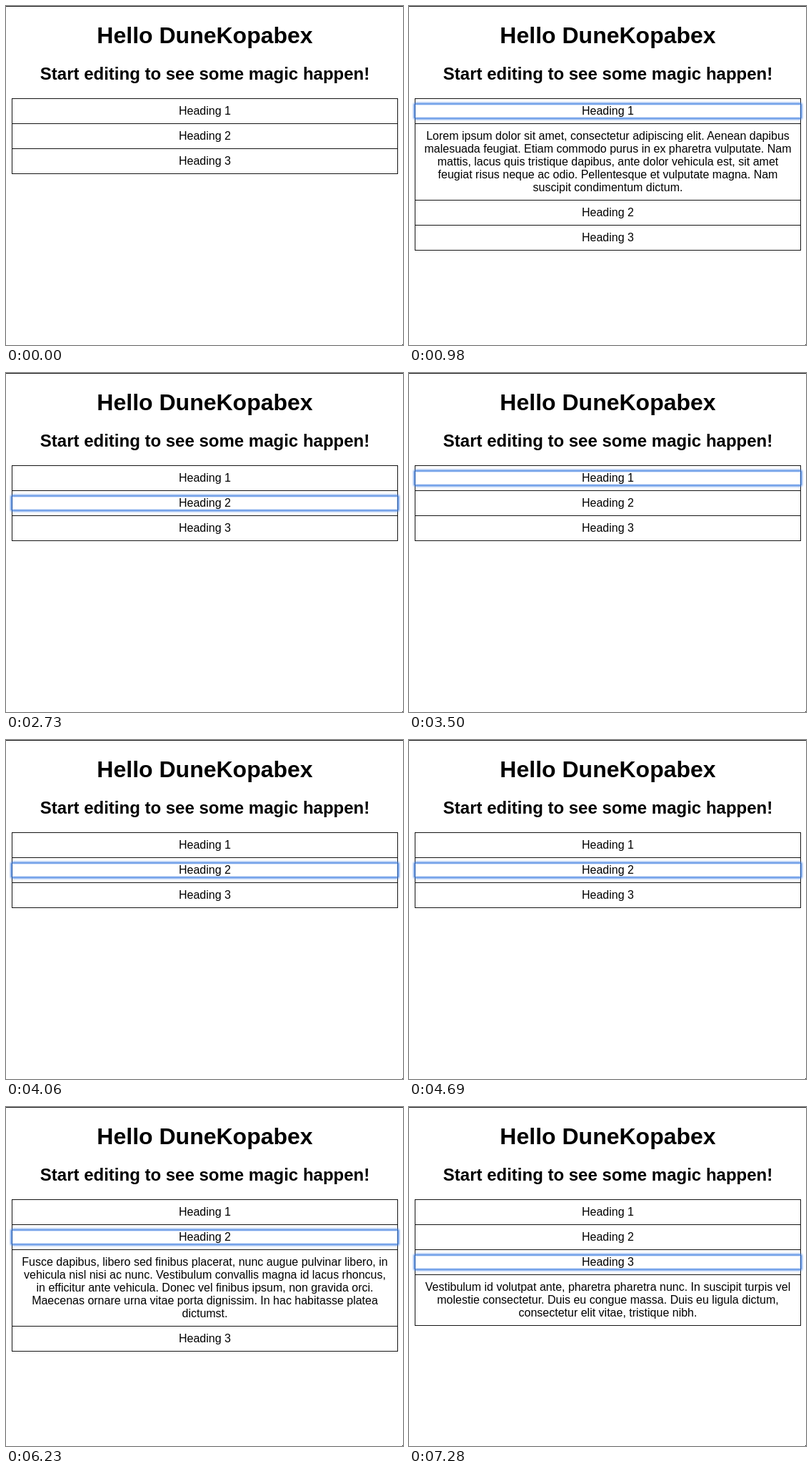
These frames come from a looping animation (556 by 474 pixels, 9100 ms). An HTML page:

```html
<!DOCTYPE html>
<html lang="en">
<head>
<meta charset="utf-8">
<title>Accordion</title>
<style>
  html, body { margin: 0; width: 100%; height: 100%; overflow: hidden; background: #fff; }
  svg { display: block; }
  text { font: 16px "Liberation Sans", Arial, sans-serif; text-anchor: middle; fill: #000; }
  .title { font-size: 32px; font-weight: bold; }
  .subtitle { font-size: 24px; font-weight: bold; }
  .line { fill: #151515; shape-rendering: crispEdges; }
  .ring rect { fill: none; stroke: #4482e2; }
</style>
</head>
<body>
<svg id="stage" width="556" height="474" viewBox="0 0 556 474"></svg>
<script>
const LOOP = 9100;
const LEFT = 8, WIDTH = 541, TOP = 129, ROW = 35, LEADING = 18, MID = 278.5;

const panels = [
  ["Lorem ipsum dolor sit amet, consectetur adipiscing elit. Aenean dapibus",
   "malesuada feugiat. Etiam commodo purus in ex pharetra vulputate. Nam",
   "mattis, lacus quis tristique dapibus, ante dolor vehicula est, sit amet",
   "feugiat risus neque ac odio. Pellentesque et vulputate magna. Nam",
   "suscipit condimentum dictum."],
  ["Fusce dapibus, libero sed finibus placerat, nunc augue pulvinar libero, in",
   "vehicula nisl nisi ac nunc. Vestibulum convallis magna id lacus rhoncus,",
   "in efficitur ante vehicula. Donec vel finibus ipsum, non gravida orci.",
   "Maecenas ornare urna vitae porta dignissim. In hac habitasse platea",
   "dictumst."],
  ["Vestibulum id volutpat ante, pharetra pharetra nunc. In suscipit turpis vel",
   "molestie consectetur. Duis eu congue massa. Duis eu ligula dictum,",
   "consectetur elit vitae, tristique nibh."]
];

// [start ms, focused heading, open panel]; 0 means none
const steps = [
  [0, 0, 0], [210, 1, 0], [980, 1, 1], [1400, 1, 0], [1960, 2, 0], [2310, 1, 0],
  [2730, 2, 0], [2940, 3, 0], [3220, 2, 0], [3430, 1, 0], [4060, 2, 0], [4200, 3, 0],
  [4690, 2, 0], [5250, 2, 2], [5600, 3, 2], [6230, 2, 2], [6930, 3, 2], [7280, 3, 3]
];

// Glow strength per pixel, from just inside the edge outwards
const glow = [0.22, 0.7, 0.75, 0.5, 0.22, 0.07];

const stage = document.getElementById("stage");

const text = (str, y, cls = "") => `<text class="${cls}" x="${MID}" y="${y}">${str}</text>`;
const bar = (x, y, w, h) => `<rect class="line" x="${x}" y="${y}" width="${w}" height="${h}"/>`;

function ring(y) {
  const rects = glow.map((alpha, i) => {
    const d = i - 0.5;
    return `<rect x="${LEFT + 1 - d}" y="${y + 9 - d}" width="${WIDTH - 2 + 2 * d}"
      height="${LEADING + 2 * d}" rx="${Math.max(0, d)}" stroke-opacity="${alpha}"/>`;
  });
  return `<g class="ring">${rects.join("")}</g>`;
}

function scene(focus, open) {
  let y = TOP, lines = "", labels = "", halo = "";
  panels.forEach((panel, i) => {
    lines += bar(LEFT, y, WIDTH, 1);
    labels += text(`Heading ${i + 1}`, y + 23);
    if (focus === i + 1) halo = ring(y);
    y += ROW;
    if (open === i + 1) {
      lines += bar(LEFT, y, WIDTH, 1);
      panel.forEach((str, n) => { labels += text(str, y + 23 + n * LEADING); });
      y += panel.length * LEADING + 17;
    }
  });
  lines += bar(LEFT, y, WIDTH, 1);
  for (const x of [LEFT, LEFT + WIDTH - 1]) lines += bar(x, TOP, 1, y - TOP);
  return bar(0, 0, 556, 1) + bar(555, 473, 1, 1) +
    text("Hello DuneKopabex", 52, "title") +
    text("Start editing to see some magic happen!", 103, "subtitle") +
    lines + halo + labels;
}

let shown;
function draw(ms) {
  const step = steps.findLast(([start]) => start <= ms);
  if (step === shown) return;
  shown = step;
  stage.innerHTML = scene(step[1], step[2]);
}

const begin = performance.now();
function tick() {
  draw((performance.now() - begin) % LOOP);
  requestAnimationFrame(tick);
}
tick();
</script>
</body>
</html>
```
